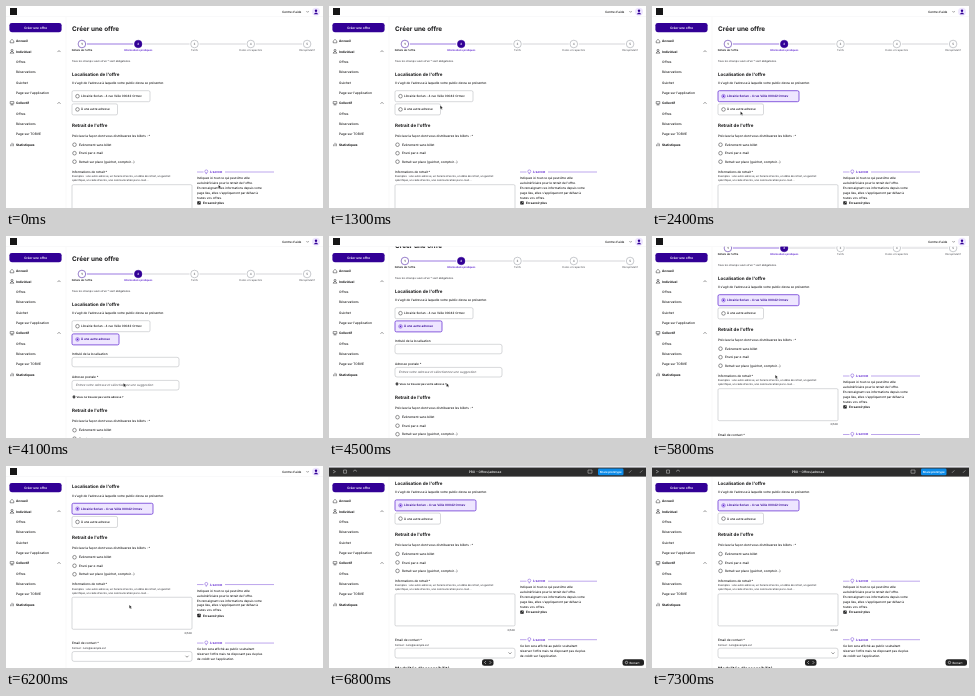
Write an HTML page that moves like this. It is 317x202 px and loops after 7600 ms.

```html
<!DOCTYPE html>
<html lang="fr">
<head>
<meta charset="utf-8">
<title>Créer une offre</title>
<style>
html, body { margin: 0; width: 100%; height: 100%; overflow: hidden; background: #fff; }
svg { display: block; width: 100vw; height: 100vh; }
text { font-family: Inter, "Open Sans", sans-serif; font-weight: 500; fill: #161617; text-rendering: geometricPrecision; white-space: pre; }
.b { font-weight: 700; }
.m { font-weight: 600; }
.i { font-style: italic; }
.mid { text-anchor: middle; }
.end { text-anchor: end; }
.grey { fill: #696a6f; }
.dim { fill: #44454a; }
.violet { fill: #5a1fcf; }
.white { fill: #fff; }
.line { fill: none; stroke: #161617; stroke-width: .45; }
.field { fill: #fff; stroke: #8f9096; stroke-width: .35; }
.on rect { fill: #eee6ff; stroke: #5a1fcf; stroke-width: .7; }
.on text { font-weight: 600; fill: #320096; }
.on .ring { stroke: #5a1fcf; }
.dot { fill: none; }
.on .dot { fill: #5a1fcf; }
</style>
</head>
<body>
<svg id="stage" viewBox="0 0 317 202" preserveAspectRatio="none"></svg>
<script>
// y is the vertical middle of the line of text
const text = (x, y, s, size = 3.1, cls = '') =>
  `<text x="${x}" y="${y + size * .36}" font-size="${size}" class="${cls}">${s}</text>`;
const rect = (x, y, w, h, r, attrs) =>
  `<rect x="${x}" y="${y}" width="${w}" height="${h}" rx="${r}" ${attrs}/>`;
const circle = (x, y, r, attrs) => `<circle cx="${x}" cy="${y}" r="${r}" ${attrs}/>`;
const path = (d, attrs = 'class="line"') => `<path d="${d}" ${attrs}/>`;
const group = (id, body) => `<g id="${id}">${body}</g>`;
const field = (x, y, w, h, r) => rect(x, y, w, h, r, 'class="field"');
const radio = (x, y) => circle(x, y, 1.8, 'class="line ring"') + circle(x, y, .9, 'class="dot"');
const choice = (id, y, label) => group(id,
  field(66, y, 78, 11, 1.5) + radio(71.5, y + 5.5) + text(75, y + 5.5, label, 3));

function steps() {
  const names = ["Détails de l'offre", 'Informations pratiques', 'Tarifs', 'Dates et capacités', 'Récapitulatif'];
  return names.map((name, i) => {
    const x = 75.9 + i * 56.3, color = i < 2 ? '#320096' : '#90949d';
    const bar = i < 4 ? path(`M${x + 5} 38H${x + 51.3}`, `stroke="${i ? '#b9bbc2' : '#5a1fcf'}" stroke-width=".6"`) : '';
    return bar
      + circle(x, 38, 3.8, `fill="${i == 1 ? color : '#fff'}" stroke="${color}" stroke-width=".5"`)
      + text(x, 38, i + 1, 3, 'mid ' + ['m', 'm white', 'grey', 'grey', 'grey'][i])
      + text(x, 44.5, name, 2.6, 'mid ' + ['m', 'm violet', 'grey', 'grey', 'grey'][i]);
  }).join('');
}

function tip(y, lines) {
  const pen = 'fill="none" stroke="#5a1fcf" stroke-width=".4"';
  return path(`M191 ${y}h6.5M219 ${y}h49`, pen)
    + circle(200.3, y - .6, 1.5, pen) + path(`M199.6 ${y + 1.6}h1.4`, pen)
    + text(203.8, y, 'À SAVOIR', 2.7, 'm violet')
    + lines.map((s, i) => text(191, y + 6 + i * 4.95, s, 3)).join('');
}

const intro = text(66, 23, 'Créer une offre', 6.4, 'b') + steps()
  + text(66, 55, "Tous les champs suivis d'un * sont obligatoires.", 2.6, 'dim')
  + text(66, 68, "Localisation de l'offre", 4.5, 'b')
  + text(66, 77, "Il s'agit de l'adresse à laquelle votre public devra se présenter.")
  + choice('venue', 84.7, 'Librairie Sorlan - 4 rue Vélie 00042 Ormev')
  + choice('other', 97.9, 'À une autre adresse');

const address = text(66, 117.5, 'Intitulé de la localisation') + field(66, 121.3, 107, 9.5, 2)
  + text(66, 140.5, 'Adresse postale *') + field(66, 144.4, 107, 9.6, 2)
  + text(70, 149.3, 'Entrez votre adresse et sélectionnez une suggestion', 3.1, 'i grey')
  + circle(68, 161, 1.4, 'fill="#161617"') + path('M67.3 161h1.4M68 160.3v1.4', 'stroke="#fff" stroke-width=".35"')
  + text(70.5, 161, 'Vous ne trouvez pas votre adresse ?', 2.7, 'm');

const pickup = text(66, 119, "Retrait de l'offre", 4.5, 'b')
  + text(66, 129.5, 'Précisez la façon dont vous distribuerez les billets : *')
  + ['Évènement sans billet', 'Envoi par e-mail', 'Retrait sur place (guichet, comptoir...)']
    .map((s, i) => radio(68.5, 138.7 + i * 8.5) + text(73, 138.7 + i * 8.5, s)).join('')
  + text(66, 165.7, 'Informations de retrait *')
  + text(66, 170.2, "Exemples : une autre adresse, un horaire d'accès, un délai de retrait, un guichet", 2.6, 'dim')
  + text(66, 174.2, "spécifique, un code d'accès, une communication par e-mail...", 2.6, 'dim')
  + field(66, 178.7, 120, 32, 1.2) + text(186, 214.5, '0/500', 2.6, 'end dim')
  + tip(166, ['Indiquez ici tout ce qui peut être utile', "au bénéficiaire pour le retrait de l'offre.",
    'En renseignant ces informations depuis votre', "page lieu, elles s'appliqueront par défaut à", 'toutes vos offres.'])
  + rect(191.3, 195.2, 3.4, 3.4, .6, 'fill="#161617"') + path('M192.2 197.7l1.6-1.6h-1M193.8 196.1v1', 'fill="none" stroke="#fff" stroke-width=".35"')
  + text(197, 197, 'En savoir plus', 3.1, 'b')
  + text(66, 224.5, 'Email de contact *') + text(66, 229.4, 'Format : nom@exemple.ext', 2.6, 'dim')
  + field(66, 233, 120, 9.8, 2) + path('M179.5 237.2l1.5 1.5 1.5-1.5')
  + tip(224.5, ['Ce lien sera affiché au public souhaitant', "réserver l'offre mais ne disposant pas du plus", "de crédit sur l'application."])
  + text(66, 253.5, "Modalités d'accessibilité", 4.5, 'b');

function sidebar() {
  const items = ['Accueil', 'Individuel', 'Offres', 'Réservations', 'Guichet', "Page sur l'application",
    'Collectif', 'Offres', 'Réservations', 'Page sur TORVE', 'Statistiques'];
  const icons = {
    0: y => `M4.2 ${y}l1.8-1.7 1.8 1.7v1.8H4.2z`,
    1: y => `M5 ${y - 1}a1 1 0 1 1 2 0a1 1 0 1 1-2 0M4 ${y + 1.8}q2-3.4 4 0z`,
    6: y => `M4.2 ${y - 1.5}h3.6v2.2H4.2zM6 ${y + .7}v1M4.6 ${y + 1.8}h2.8`,
    10: y => `M4.6 ${y + 1.7}v-1.8M6 ${y + 1.7}v-3.4M7.4 ${y + 1.7}v-2.6`
  };
  return path('M60 11V202', 'stroke="#f0f0f3" stroke-width=".5"')
    + rect(3.4, 16.9, 52.2, 9.3, 2.4, 'fill="#320096"') + text(29.5, 21.5, 'Créer une offre', 3.15, 'm mid white')
    + items.map((s, i) => {
      const y = 35 + i * 10.35, icon = icons[i];
      return (icon ? path(icon(y)) : '') + text(10, y, s, 3.2, icon ? 'b' : '')
        + (i == 1 || i == 6 ? path(`M51.5 ${y + .7}l1.5-1.5 1.5 1.5`) : '');
    }).join('');
}

const header = rect(0, 0, 317, 10.3, 0, 'fill="#fff"') + path('M0 10.5H317', 'stroke="#efeff3" stroke-width=".4"')
  + rect(4, 2, 7, 7, 0, 'fill="#161617"')
  + text(276, 5.8, "Centre d'aide", 3) + path('M300.5 5.2l1.1 1.1 1.1-1.1')
  + circle(310, 5.8, 4, 'fill="#eee6ff"') + circle(310, 4.7, 1.2, 'fill="#320096"') + path('M307.8 8.2q2.2-3.6 4.4 0z', 'fill="#320096"');

const viewer = rect(0, 0, 317, 10.6, 0, 'fill="#2c2c2c"') + rect(0, 0, 317, 1.6, 0, 'fill="#e4e4e8"')
  + path('M4 4.2l2.5 1.4-2.5 1.4M14.5 4h3v3.2h-3zM24.5 5.6a1.5 1.5 0 1 1 3 0M259 4h4v3.2h-4zM300 6.8l2.4-2.4M311 6.8l2.4-2.4', 'fill="none" stroke="#ccc" stroke-width=".5"')
  + text(156, 5.7, 'PRO - Offres/adresse', 3.2, 'mid white')
  + rect(269, 2.4, 25.5, 6.8, 1.3, 'fill="#0d8ce9"') + text(281.7, 5.8, 'Share prototype', 2.8, 'm mid white')
  + rect(153, 193.2, 11.5, 6.6, 2.5, 'fill="#222"')
  + path('M157 195l-1.5 1.5 1.5 1.5M160.5 195l1.5 1.5-1.5 1.5', 'fill="none" stroke="#fff" stroke-width=".5"')
  + rect(293.5, 193.2, 21.5, 6.6, 2.5, 'fill="#222"')
  + circle(297.5, 196.5, 1.2, 'fill="none" stroke="#fff" stroke-width=".5"') + text(300.5, 196.5, 'Restart', 2.9, 'white');

const $ = id => document.getElementById(id);
$('stage').innerHTML = group('page', intro + group('address', address) + group('pickup', pickup))
  + sidebar() + header + group('viewer', viewer)
  + group('cursor', path('M0 0v3.4l.9-.8.6 1.3.7-.3-.7-1.3h1.1z', 'fill="#111" stroke="#fff" stroke-width=".2"'));

// [start, end, x, y]: the pointer glides to x, y in that time
const moves = [[400, 700, 208, 173], [900, 1400, 100, 91], [1900, 2300, 92, 100], [2300, 2400, 88.5, 105.5],
  [3600, 3900, 117.5, 147.3], [4900, 5200, 100, 64], [5400, 5700, 123.3, 139], [6400, 6800, 150, -8]];
const ease = (t, a, b) => {
  const p = Math.min(1, Math.max(0, (t - a) / (b - a)));
  return p * p * (3 - 2 * p);
};
const shift = (id, x, y) => $(id).setAttribute('transform', `translate(${x} ${y})`);
const show = (id, on) => $(id).style.display = on ? '' : 'none';
function pick(id, on, width) {
  $(id).setAttribute('class', on ? 'on' : '');
  $(id).firstChild.setAttribute('width', width);
}

function draw(now) {
  const t = Math.floor(now % 7600 / 100) * 100;
  const other = t >= 2800 && t < 5300;
  const venue = t >= 1500 && !other;
  pick('venue', venue, venue ? 81 : 78);
  pick('other', other, other ? 47 : 45.5);
  show('address', other);
  shift('pickup', 0, other ? 55.5 : 0);
  shift('page', 0, -26 * ease(t, 4200, 4800) - 24.8 * ease(t, 5800, 6320));
  show('viewer', t >= 6600);
  let x = 212.5, y = 179;
  for (const [a, b, toX, toY] of moves) {
    const p = ease(t, a, b);
    x += (toX - x) * p;
    y += (toY - y) * p;
  }
  shift('cursor', x, y);
}
const start = performance.now();
function tick() {
  draw(performance.now() - start);
  requestAnimationFrame(tick);
}
tick();
</script>
</body>
</html>
```
